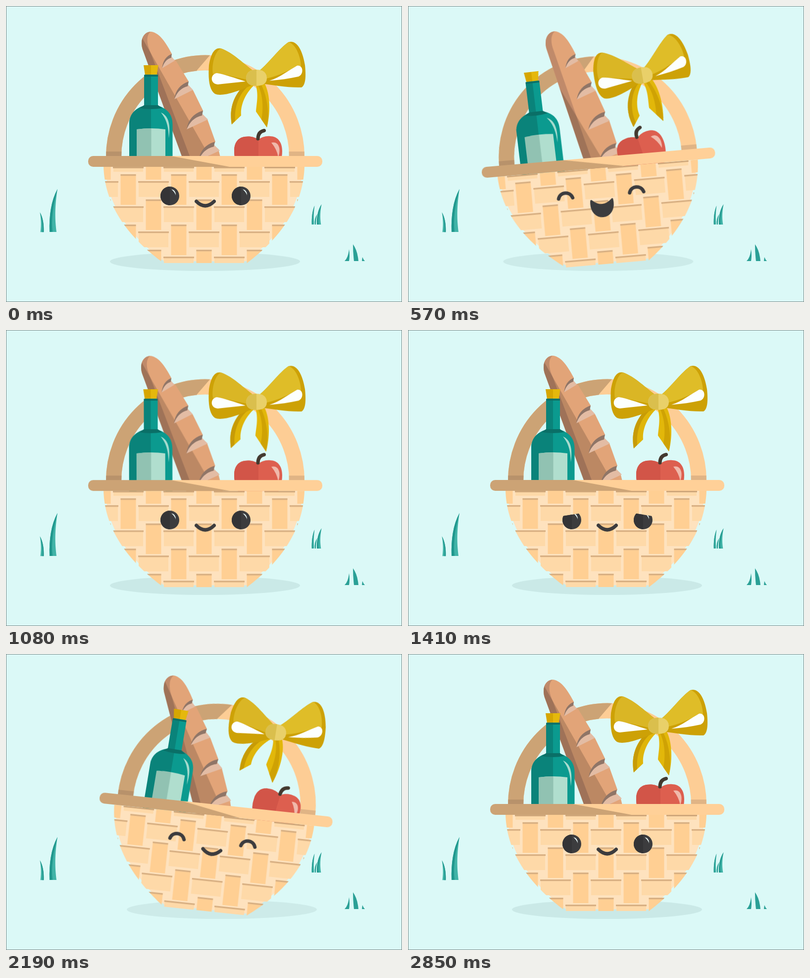
Animation of 800x600 px, one loop 3000 ms. Source, as an HTML page:

```html
<!DOCTYPE html>
<html lang="en">
<head>
<meta charset="utf-8">
<title>Picnic basket</title>
<style>
html, body { margin: 0; width: 100%; height: 100%; overflow: hidden; background: #dbf9f7; }
svg { display: block; width: 100vw; height: 100vh; }

.move { animation: 3s ease-in-out infinite; }
#shadow { transform-origin: 402px 518px; animation-name: shadow; }
#hop { animation-name: hop; }
#tilt { transform-origin: 402px 521px; animation-name: tilt; }
#bread { transform-origin: 400px 430px; animation-name: bread; }
#shade { transform-origin: 400px 300px; animation-name: shade; }
#bottle { transform-origin: 293px 430px; animation-name: bottle; }
#apple { transform-origin: 510px 306px; animation-name: apple; }
#bow, #tailL, #tailR { transform-origin: 506px 146px; }
#bow { animation-name: bow; }
#tailL { animation-name: tailL; }
#tailR { animation-name: tailR; }
.lid { animation-name: lid; }
#left { --lean: -9deg; transform-origin: 331px 362px; }
#right { --lean: 9deg; transform-origin: 475px 362px; }
#happy { animation-name: happy; animation-timing-function: step-end; }
#mouth { animation-name: mouth; }

@keyframes shadow {
  0%, 1%, 26%, 65.5%, 89%, 100% { transform: translateX(0) scaleX(1); opacity: 1; }
  6% { transform: translateX(18px) scaleX(1); opacity: 1; }
  11%, 12% { transform: translateX(0) scaleX(.83); opacity: .75; }
  18.3% { transform: translateX(-18px) scaleX(1); opacity: .9; }
  71.3% { transform: translateX(40px) scaleX(1); opacity: .85; }
  79.8%, 81% { transform: translateX(-30px) scaleX(1); opacity: .85; }
}
@keyframes hop {
  0% { transform: translateY(0); }
  6% { transform: translateY(0); animation-timing-function: ease-out; }
  11.7% { transform: translateY(-39.5px); animation-timing-function: ease-in; }
  18% { transform: translateY(0); animation-timing-function: ease-out; }
  23.5% { transform: translateY(6px); }
  27% { transform: translateY(4.5px); }
  37.5%, 100% { transform: translateY(0); }
}
@keyframes tilt {
  0%, 1%, 26%, 65.5%, 89%, 100% { transform: rotate(0); }
  5.5% { transform: rotate(7.5deg); }
  18.5% { transform: rotate(-5deg); }
  71.3% { transform: rotate(7deg); }
  79.7% { transform: rotate(-3.6deg); }
  81% { transform: rotate(-3.2deg); }
}
@keyframes bread {
  0%, 1%, 37%, 65.5%, 95%, 100% { transform: translate(0, 0) rotate(0); }
  6% { transform: translate(0, 0) rotate(-1deg); }
  11% { transform: translate(1px, -10px) rotate(2.5deg); }
  18.5% { transform: translate(2px, 0) rotate(6.5deg); }
  23% { transform: translate(3px, 3px) rotate(8deg); }
  27% { transform: translate(3px, 4px) rotate(6.8deg); }
  33.5% { transform: translate(0, 0) rotate(-1deg); }
  71.3% { transform: translate(0, 0) rotate(0); }
  80.5% { transform: translate(0, 0) rotate(-6.8deg); }
  81% { transform: translate(0, 0) rotate(-6.6deg); }
  88.5% { transform: translate(0, 0) rotate(1.5deg); }
}
@keyframes shade {
  0%, 1%, 37%, 100% { transform: translateX(0) rotate(0); }
  11% { transform: translateX(-22px) rotate(-6deg); }
  27% { transform: translateX(-16px) rotate(0); }
}
@keyframes bottle {
  0%, 1%, 37%, 65.5%, 95%, 100% { transform: translateY(0) rotate(0); }
  6% { transform: translateY(0) rotate(2deg); }
  11% { transform: translateY(-8px) rotate(-6.4deg); }
  18.5% { transform: translateY(0) rotate(-2deg); }
  23% { transform: translateY(0) rotate(4deg); }
  27% { transform: translateY(0) rotate(2.65deg); }
  33% { transform: translateY(0) rotate(-1deg); }
  71.5% { transform: translateY(0) rotate(4deg); }
  81% { transform: translateY(0) rotate(-8deg); }
  88.5% { transform: translateY(0) rotate(1.5deg); }
}
@keyframes apple {
  0%, 1%, 26%, 65.5%, 90%, 100% { transform: translate(0, 0) rotate(0); }
  6% { transform: translate(7px, 0) rotate(6deg); }
  11% { transform: translate(-24px, -47px) rotate(-11deg); }
  12.5% { transform: translate(-25px, -50px) rotate(-13deg); }
  19% { transform: translate(-16px, 0) rotate(-14deg); }
  72% { transform: translate(13px, 0) rotate(11deg); }
  81% { transform: translate(-21px, -3px) rotate(-17deg); }
}
@keyframes bow {
  0%, 1%, 36%, 65.5%, 92%, 100% { transform: translate(0, 0) rotate(0); }
  6% { transform: translate(0, 0) rotate(3deg); }
  11% { transform: translate(-2px, -5px) rotate(-.5deg); }
  18.5% { transform: translate(0, 1px) rotate(-5deg); }
  27% { transform: translate(0, 0) rotate(-1deg); }
  72% { transform: translate(0, 0) rotate(3deg); }
  81% { transform: translate(0, 0) rotate(-6.3deg); }
}
@keyframes tailL {
  0%, 1%, 38%, 65.5%, 95%, 100% { transform: rotate(0); }
  5% { transform: rotate(8deg); }
  11% { transform: translate(-2px, -5px) rotate(-50deg); }
  18.5% { transform: rotate(-14deg); }
  22% { transform: rotate(-4deg); }
  27% { transform: rotate(-16deg); }
  33% { transform: rotate(3deg); }
  72% { transform: rotate(10deg); }
  81% { transform: rotate(-11.8deg); }
  88.5% { transform: rotate(3deg); }
}
@keyframes tailR {
  0%, 1%, 38%, 65.5%, 95%, 100% { transform: rotate(0); }
  5% { transform: rotate(8deg); }
  11% { transform: translate(-2px, -5px) rotate(-22.9deg); }
  18.5% { transform: rotate(-8deg); }
  22% { transform: rotate(-3deg); }
  27% { transform: rotate(-11.8deg); }
  33% { transform: rotate(3deg); }
  72% { transform: rotate(10deg); }
  81% { transform: rotate(-2.1deg); }
  88.5% { transform: rotate(2deg); }
}
@keyframes lid {
  0%, 1%, 26%, 46%, 53%, 66.5%, 90%, 100% { transform: rotate(var(--lean)) translateY(0); }
  4.3%, 22.5%, 70%, 87% { transform: rotate(var(--lean)) translateY(46px); }
  47% { transform: rotate(var(--lean)) translateY(12px); }
  49.5% { transform: rotate(var(--lean)) translateY(32px); }
}
@keyframes happy {
  0% { opacity: 0; }
  4% { opacity: 1; }
  23% { opacity: 0; }
  69.7% { opacity: 1; }
  87.3%, 100% { opacity: 0; }
}
@keyframes mouth {
  0%, 3%, 24%, 100% {
    d: path("M384.5 396 Q402.5 414 420.5 396 C408.5 408 396.5 408 384.5 396 Z");
    stroke-width: 7px;
  }
  8%, 17% {
    d: path("M380.5 390 Q402.5 410 424.5 390 C435 441 370 441 380.5 390 Z");
    stroke-width: 3px;
  }
}
</style>
</head>
<body>
<svg viewBox="0 0 800 600" preserveAspectRatio="none">
  <defs>
    <path id="body" d="M197 326 C200 410 252 472 318 521 H487 C551 472 600 410 603 326 Z"/>
    <path id="loaf" d="M276 88 C270 68 278 53 292 52 C307 53 320 68 335 97 L333 104 L344 112 L369 153 L366 161 L378 171 L398 212 L395 220 L407 230 L423 275 L419 282 L429 290 L440 335 L452 400 H395 L355 304 Z"/>
    <clipPath id="bodyClip"><use href="#body"/></clipPath>
    <clipPath id="loafClip"><use href="#loaf"/></clipPath>
    <clipPath id="rimClip"><rect x="166" y="304" width="473" height="22" rx="10"/></clipPath>
    <clipPath id="handleDark"><path d="M190 80 H429 L386 130 L340 310 H190 Z"/></clipPath>
    <clipPath id="lidL"><rect class="move lid" id="left" x="280" y="362" width="102" height="70"/></clipPath>
    <clipPath id="lidR"><rect class="move lid" id="right" x="424" y="362" width="102" height="70"/></clipPath>

    <g id="cell">
      <path fill="#fed9a8" d="M-30 0h60v32h-60z"/>
      <path fill="#d8b083" d="M-31 0h62v3.2h-62z"/>
      <path fill="#ffcf93" d="M-15.5 37h31v62h-31z"/>
      <path fill="#d8b083" d="M-15.5 37h31v3.2h-31z"/>
    </g>
    <g id="cut">
      <path fill="#e3bca4" d="M-33 38 Q-24 13 -2 6 L10 18 Z"/>
      <path fill="#8f7567" d="M0 0 Q-29 9 -33 38 Q-24 15 -2 10 Z"/>
    </g>
    <g id="eye">
      <circle cx="331" cy="385" r="19" fill="#3c3c3e"/>
      <path fill="#343436" d="M331 366 A19 19 0 0 0 331 404 Z"/>
      <path fill="#e8f8f7" d="M334 371.5 Q343.5 373 343 384 Q341 377 334 371.5 Z"/>
    </g>
    <path id="arc" d="M316 381.5 C320 367 340 367 344.5 381.5"/>
    <g id="blade">
      <path fill="#40b3a7" d="M104 371 C91 395 87 425 88 458 H102 C100 440 97 415 104 371 Z"/>
      <path fill="#1f978d" d="M104 371 C91 395 87 425 88 458 H94 C91 432 95 405 104 371 Z"/>
    </g>
  </defs>

  <rect width="800" height="600" fill="#dbf9f7"/>

  <use href="#blade"/>
  <use href="#blade" transform="translate(118.5 247.6) scale(-.48 .46)"/>
  <use href="#blade" transform="translate(587 242.2) scale(.35 .438)"/>
  <use href="#blade" transform="translate(577.2 227.2) scale(.58 .471)"/>
  <g fill="#2aa096">
    <path d="M628.5 422 Q622 432 624 443 H626 Q626 432 628.5 422 Z"/>
    <path d="M693 493 Q691 511 684 517 H693 Q695 505 693 493 Z"/>
    <path d="M701 483 Q701 500 703 517 H712 Q710 495 701 483 Z"/>
    <path d="M720 509 L719 517 H725 Q722 514 720 509 Z"/>
  </g>

  <ellipse class="move" id="shadow" cx="402" cy="518" rx="192" ry="19" fill="#cae9e7"/>

  <g class="move" id="hop"><g class="move" id="tilt">
    <g fill="none" stroke-width="31">
      <path stroke="#fdcd95" d="M217.5 305 A185 190 0 0 1 587.5 305"/>
      <path stroke="#cca375" clip-path="url(#handleDark)" d="M217.5 305 A185 190 0 0 1 587.5 305"/>
    </g>
    <path fill="#b8926b" d="M202.3 295h31v10h-31z"/>
    <path fill="#e0b485" d="M571.7 295h31v10h-31z"/>

    <g class="move" id="bread">
      <use href="#loaf" fill="#e2a478"/>
      <path fill="#c08a6a" d="M276 88 C270 68 278 53 292 52 C283 60 284 76 291 92 L371 304 L410 400 H395 L355 304 Z"/>
      <g clip-path="url(#loafClip)">
        <path class="move" id="shade" opacity=".17" d="M252 24 L465 400 H200 V24 Z"/>
      </g>
      <use href="#cut" transform="translate(335 97) scale(.6 .77)"/>
      <use href="#cut" transform="translate(369 153) scale(.88 .95)"/>
      <use href="#cut" transform="translate(398 212)"/>
      <use href="#cut" transform="translate(422 275)"/>
    </g>

    <g class="move" id="bottle">
      <path fill="#d6a602" d="M278 120 H307.5 L304.5 140 H281 Z"/>
      <path fill="#e5b80c" d="M293 120 H307.5 L304.5 140 H293 Z"/>
      <path fill="#0b9a8f" d="M279 143 Q279 139 283 139 H304 Q307 139 307 143 V202 C326 208 336.5 220 336.5 240 V345 H249 V240 C249 220 260 208 279 202 Z"/>
      <path fill="#0a837a" d="M279 143 Q279 139 283 139 H293 V345 H249 V240 C249 220 260 208 279 202 Z"/>
      <path fill="#0a6f67" d="M279 139.5 H307 V143 H279 Z M279 201 H307 L316 207 Q293 211 270 207 Z"/>
      <path fill="#a9dccf" d="M313 216 C328 222 333 240 329 268 C328 244 325 231 313 216 Z"/>
      <path fill="#b0dece" d="M264 250 Q293 246 322 250 V345 H264 Z"/>
      <path fill="#91c2b2" d="M264 250 Q279 248 293.5 248 V345 H264 Z"/>
    </g>

    <g class="move" id="apple">
      <path fill="#dd5f4f" d="M510 271 C500 264 490 264 482 265 C468 267 461 278 461 294 C461 325 480 349 498 349 Q509 347 520 349 C540 349 558 325 558 294 C558 275 548 264 534 264 C524 263 516 266 510 271 Z"/>
      <path fill="#d25548" d="M510 271 C500 264 490 264 482 265 C468 267 461 278 461 294 C461 325 480 349 498 349 Q504 348 510 348 Z"/>
      <path fill="#f0b9ab" d="M536 277 Q550 274 552.5 290 Q553 299 550 306 Q547 290 536 277 Z"/>
      <path fill="none" stroke="#43392f" stroke-width="7" stroke-linecap="round" d="M509 269 Q509 255 521.5 252.5"/>
    </g>

    <g class="move" id="tailR">
      <path fill="#e2b70a" d="M504 158 C511 180 506 198 505 214 L527 246 C534 220 535 180 522 156 Z"/>
      <path fill="#cfa204" d="M508 158 C520 180 520 210 516 230 L527 246 C534 220 527 180 514 156 Z"/>
    </g>
    <g class="move" id="tailL">
      <path fill="#dfb509" d="M484 158 C462 178 450 205 456 240 L475 222 C473 200 485 175 502 160 Z"/>
      <path fill="#c79b06" d="M484 158 C462 178 450 205 456 240 L463 233 C461 205 470 178 492 160 Z"/>
    </g>
    <g class="move" id="bow">
      <path fill="#cda106" d="M506 136 C480 118 460 95 434 86 C418 83 413 104 410 120 C408 150 411 170 422 178 C434 184 465 176 506 156 Z"/>
      <path fill="#dab625" d="M506 136 C480 118 460 95 434 86 C422 92 415 118 418 138 C440 136 470 148 506 152 Z"/>
      <path fill="#cda106" d="M506 136 C530 118 552 85 571 73 C590 68 600 95 604 120 C606 140 606 160 597 165 C570 166 540 160 506 156 Z"/>
      <path fill="#dfbd28" d="M506 136 C530 118 552 85 571 73 C586 78 595 102 596 122 C570 128 550 146 506 150 Z"/>
      <g fill="#fcfffe">
        <path d="M426 136 C440 138 462 146 484 153 C465 155 445 157 428 159 C412 158 412 138 426 136 Z"/>
        <path d="M588 121 C601 119 602 139 591 143 C573 147 553 150 532 151.5 C553 145 570 131 588 121 Z"/>
      </g>
      <path fill="#e9d069" d="M494 131 Q506 127 518 131 Q527 136 527 146 Q527 156 518 160 Q506 164 494 160 Q485 156 485 146 Q485 136 494 131 Z"/>
      <path fill="#dabf4d" d="M506 129 Q500 129 494 131 Q485 136 485 146 Q485 156 494 160 Q500 162 506 162 Z"/>
    </g>

    <use href="#body" fill="#fee2be" transform="translate(400 326) scale(.982) translate(-400 -326)"/>
    <g id="weave" clip-path="url(#bodyClip)"></g>

    <g clip-path="url(#rimClip)">
      <path fill="#ffd098" d="M166 304h473v22h-473z"/>
      <path fill="#cca375" d="M166 304 H333 L452 326 H166 Z"/>
    </g>

    <g clip-path="url(#lidL)"><use href="#eye"/></g>
    <g clip-path="url(#lidR)"><use href="#eye" x="144"/></g>
    <g class="move" id="happy" fill="none" stroke="#3c3c3e" stroke-width="7" stroke-linecap="round">
      <use href="#arc"/>
      <use href="#arc" x="144"/>
    </g>
    <path class="move" id="mouth" fill="#3c3c3e" stroke="#3c3c3e" stroke-width="7" stroke-linejoin="round" d="M384.5 396 Q402.5 414 420.5 396 C408.5 408 396.5 408 384.5 396 Z"/>
  </g></g>

  <rect x=".5" y=".5" width="799" height="599" fill="none" stroke="#7d8c8b"/>
</svg>
<script>
const weave = document.getElementById("weave");
const add = (tag, attrs) => {
  const el = document.createElementNS("http://www.w3.org/2000/svg", tag);
  for (const key in attrs) el.setAttribute(key, attrs[key]);
  weave.append(el);
};

// Woven strips on a 51 px checkerboard
for (let row = -1; row < 5; row++) {
  for (let col = 0; col < 9; col++) {
    if ((row + col) % 2) add("use", { href: "#cell", x: 196 + 51 * col, y: 304 + 51 * row });
  }
}
for (let x = 216; x < 600; x += 102) {
  add("rect", { x, y: 326, width: 62, height: 3, fill: "#d0a87b" });
}
</script>
</body>
</html>
```
